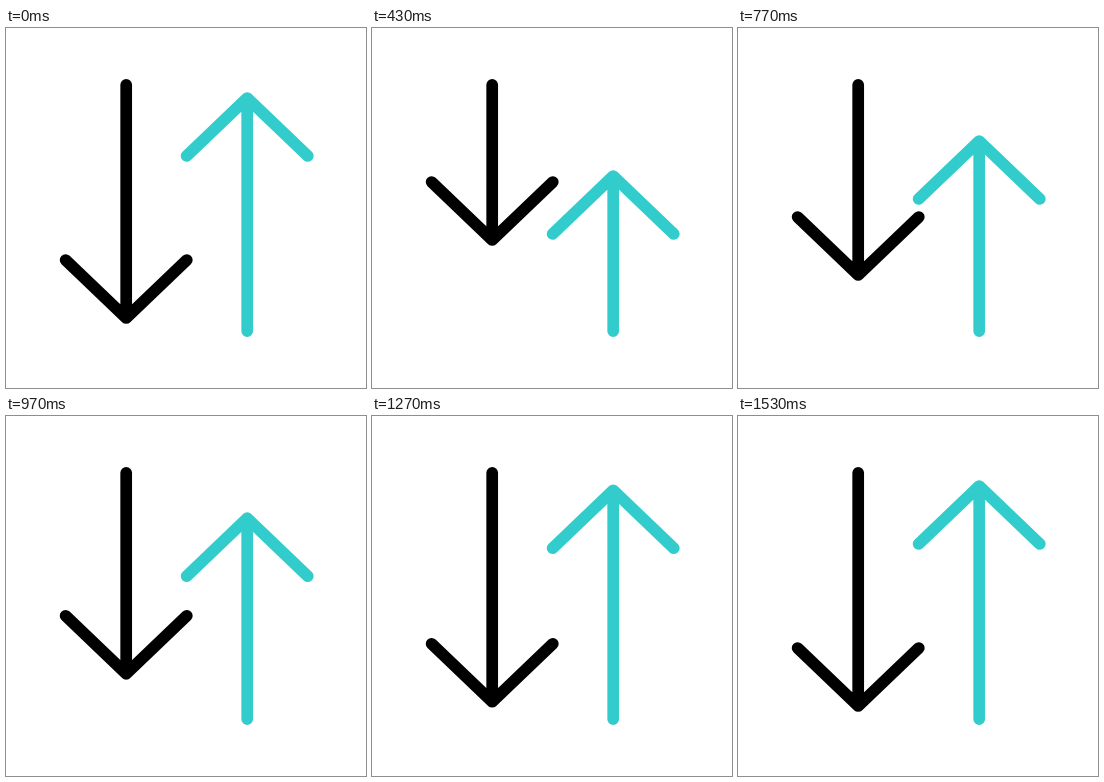
Animation of 360 by 360 pixels, one loop 2 s. Source, as an HTML page:

```html
<!DOCTYPE html>
<html lang="en">
<head>
<meta charset="utf-8">
<title>Down and up arrows</title>
<style>
  html, body { margin: 0; width: 100%; height: 100%; overflow: hidden; background: #fff; }
  svg { display: block; width: 100vw; height: 100vh; }
  path { fill: none; stroke-width: 11.7; stroke-linecap: round; stroke-linejoin: round; }
</style>
</head>
<body>
<svg viewBox="0 0 360 360">
  <path id="down" stroke="#000"/>
  <path id="up" stroke="#33cccc"/>
</svg>
<script>
  const LOOP = 2000, FPS = 30;
  // [frame, how far each arrow is shortened]
  const KEYS = [[0, 0], [15, 82], [25, 38.5], [40, 2.5], [45, 0]];
  const down = document.getElementById('down');
  const up = document.getElementById('up');

  const ease = s => s * s * (3 - 2 * s);

  function shrinkAt(frame) {
    const i = KEYS.findIndex(k => frame < k[0]);
    if (i < 0) return 0;
    const [f0, v0] = KEYS[i - 1], [f1, v1] = KEYS[i];
    return v0 + (v1 - v0) * ease((frame - f0) / (f1 - f0));
  }

  // dir: 1 points down, -1 points up
  function arrow(x, tail, tip, dir) {
    const wing = tip - dir * 58;
    return `M${x} ${tail}V${tip}M${x - 60.6} ${wing}L${x} ${tip}L${x + 60.6} ${wing}`;
  }

  function draw(now) {
    const t = now % LOOP;
    const frame = Math.floor((t + 3.4) * FPS / 1000);
    const d = shrinkAt(frame);
    down.setAttribute('d', arrow(120.2, 56.8, 290 - d, 1));
    up.setAttribute('d', arrow(241.2, 303.2, 70 + d, -1));
  }

  const start = performance.now();
  function tick() {
    draw(performance.now() - start);
    requestAnimationFrame(tick);
  }
  tick();
</script>
</body>
</html>
```
